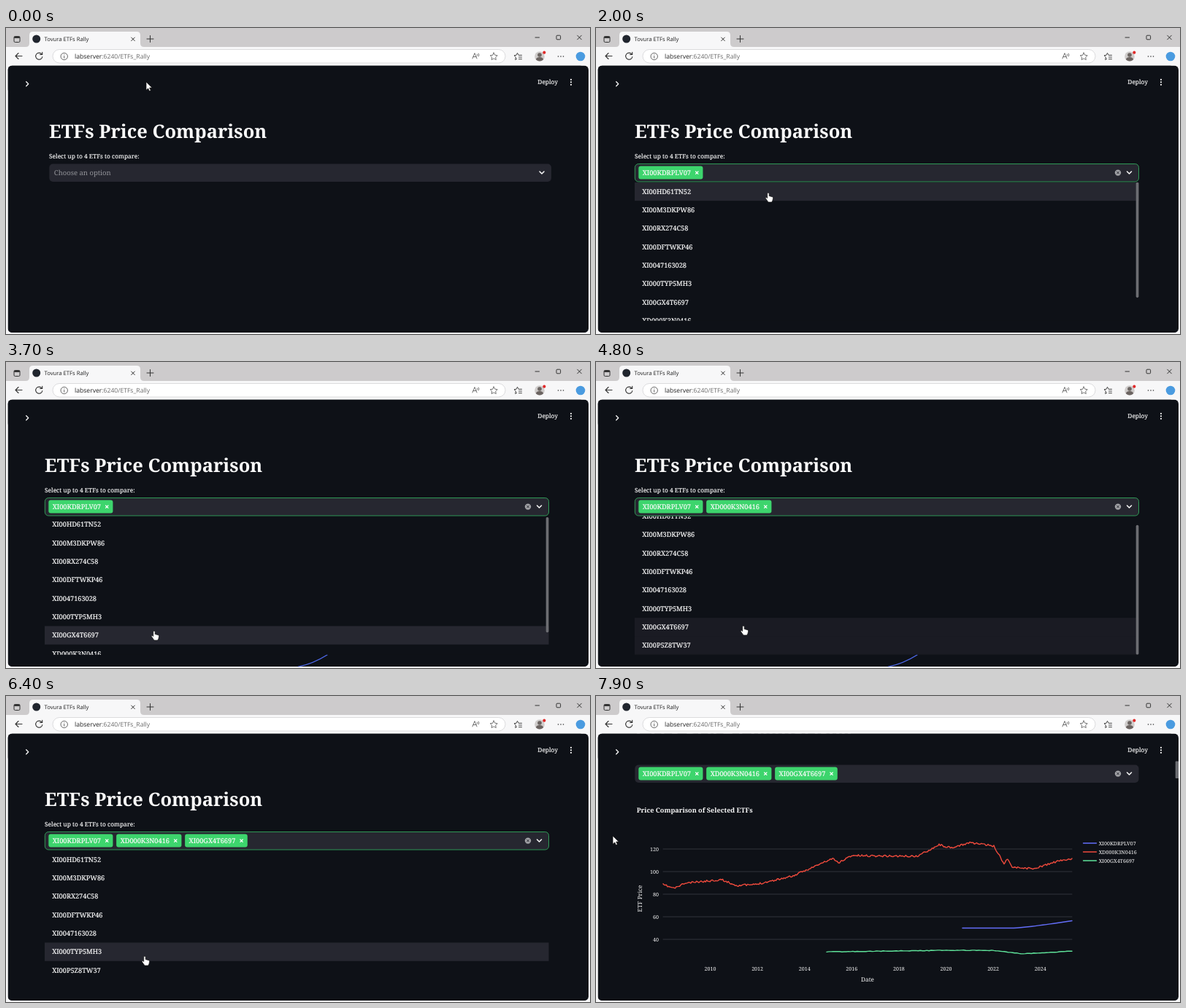
Animation, 800 px wide and 420 px high, one loop 8 s. Source, as an HTML page:

```html
<!DOCTYPE html>
<html lang="en">
<head>
<meta charset="utf-8">
<title>Price comparison</title>
<style>
  html, body { margin: 0; width: 100%; height: 100%; overflow: hidden; background: #f7f7f8; }
  svg { display: block; width: 800px; height: 420px; }
  text { font-family: "Noto Serif", serif; fill: #fafafa; white-space: pre; text-rendering: geometricPrecision; }
  .ui { font-family: "Open Sans", "Noto Sans", sans-serif; fill: #222; }
  .opt { font-size: 9.2px; stroke: #fafafa; stroke-width: .2; }
  .small { font-size: 8.4px; stroke: #fafafa; stroke-width: .15; }
  .faint { fill: #94959a; stroke: none; }
  .tick { font-size: 7.1px; }
  .axis { font-size: 8.2px; text-anchor: middle; }
  .line { fill: none; stroke-linecap: round; stroke-linejoin: round; }
</style>
</head>
<body>
<svg id="stage" viewBox="0 0 800 420"></svg>
<script>
const LOOP = 8000, ROW = 25.33, TOP = 211.8, VIEW = 190;
const PAGE = '#0e1117', FIELD = '#262730', GREEN = '#3dd56d', WHITE = '#fafafa', THUMB = '#6c6d72';
const CODES = ['XI00KDRPLV07', 'XI00HD61TN52', 'XI00M3DKPW86', 'XI00RX274C58', 'XI00DFTWKP46',
  'XI0047163028', 'XI000TYP5MH3', 'XI00GX4T6697', 'XD000K3N0416', 'XI00P5Z8TW37'];
const OPEN = 700, CLOSE = 7380, CHART = 6750;
const PICKS = [{ at: 1950, code: 0 }, { at: 4710, code: 8 }, { at: 6000, code: 7 }];
const RUNS = [[2250, 2600], [5250, 5900], [6450, 7200]];
// pointer moves: start, end, x, y
const START = [192, 74];
const MOVES = [[150, 600, 240, 203], [1150, 1500, 236, 226], [2200, 2700, 228, 256], [2850, 3550, 203, 369],
  [4450, 4460, 202, 362], [4850, 5300, 193, 344], [5300, 5600, 190, 357], [6450, 6800, 23, 192]];

const $ = id => document.getElementById(id);
const tag = (name, attrs, body = '') =>
  `<${name} ${Object.entries(attrs).map(([k, v]) => `${k}="${v}"`).join(' ')}>${body}</${name}>`;
const rect = (x, y, width, height, fill, rx = 0, more = {}) => tag('rect', { x, y, width, height, fill, rx, ...more });
const dot = (cx, cy, r, fill, more = {}) => tag('circle', { cx, cy, r, fill, ...more });
const ring = (x, y, r, stroke) => dot(x, y, r, 'none', { stroke });
const line = (d, stroke, w = 1, more = {}) => tag('path', { class: 'line', d, stroke, 'stroke-width': w, ...more });
const text = (x, y, s, cls, more = {}) => tag('text', { x, y, class: cls, ...more }, s);
const cross = (x, y, r, color, w) => line(`M${x - r} ${y - r}l${2 * r} ${2 * r}m0 ${-2 * r}l${-2 * r} ${2 * r}`, color, w);
const group = (id, body, more = {}) => tag('g', { id, ...more }, body);
const poly = pts => 'M' + pts.map(p => p.map(v => v.toFixed(1)).join(' ')).join('L');
const range = (n, f) => Array.from({ length: n }, (_, i) => f(i));
const lerp = (a, b, u) => a + (b - a) * u;
const ease = (t, a, b) => {
  const u = Math.min(1, Math.max(0, (t - a) / (b - a)));
  return u * u * (3 - 2 * u);
};

let seed = 11;
const rand = () => (seed = seed * 16807 % 2147483647) / 2147483647;

function star(cx, cy, r) {
  const pts = range(10, i => {
    const a = i * Math.PI / 5, q = i % 2 ? r * .5 : r;
    return [cx + q * Math.sin(a), cy - q * Math.cos(a)];
  });
  return poly(pts) + 'z';
}

function browser() {
  const ink = '#333', grey = '#666';
  const frame = rect(0, 0, 800, 26, '#cdcbcc') +
    tag('path', { d: 'M27 26q5 0 5-5v-11q0-5 5-5h142q5 0 5 5v11q0 5 5 5z', fill: '#f7f7f8' });
  const tabs = rect(11, 11.5, 8, 8, 'none', 1.5, { stroke: ink }) + rect(11, 11.5, 8, 2.5, ink, 1) +
    dot(41.7, 15, 5.5, '#20252e') + text(52.5, 18, 'Tovura ETFs Rally', 'ui', { 'font-size': 7.7 }) +
    cross(174, 15.3, 2.3, ink, 1) + line('M193 15h9m-4.5-4.5v9', ink);
  const controls = line('M725 13h5.5', ink) + rect(754, 10.2, 5.6, 5.6, 'none', 1, { stroke: ink }) +
    cross(785.5, 13, 2.8, ink, 1);
  const address = line('M22 38.5h-9m4-4l-4 4l4 4', ink, 1.1) +
    line('M49 36a4.6 4.6 0 1 0 .8 3.5M49.7 33.3v3.2h-3.2', ink, 1.1) +
    rect(64, 29.5, 620, 18.5, '#fff', 9.2, { stroke: '#d4d4d6', 'stroke-width': .8 }) +
    ring(79.7, 39, 4.7, grey) + line('M79.7 38.5v2.8M79.7 36.6v.1', grey) +
    text(94, 42, `labserver${tag('tspan', { fill: '#6a6a6a' }, ':6240/ETFs_Rally')}`, 'ui', { 'font-size': 8.6 });
  const tools = line('M639 42l3-7.5l3 7.5m-5-2.5h4M645.5 36q1 1 0 2.2M647.3 35q1.6 2 0 4', grey, .9) +
    line(star(668.2, 39.3, 5.3), grey, .9) +
    line('M706.5 37.3h-4.3l-1.7-3l-1.5 3l-3 .4l2.400 2.300l-.7 3.500l2-1.200M702.500 40h4m-4 2.700h4', ink, .9) +
    dot(731, 39, 6.8, '#cfcccb') + dot(731, 37, 2.8, '#6b6461') +
    tag('path', { d: 'M726 43.5q0-3.500 5-3.500t5 3.500q-5 4-10 0z', fill: '#6b6461' }) + dot(737.3, 33.7, 2.1, '#e02b2b') +
    range(3, i => dot(756.5 + i * 3.5, 39, .8, ink)).join('') + dot(787, 39, 6.3, '#4a9be0');
  return frame + tabs + controls + address + tools;
}

// fills the gaps between key points with seeded jitter
function rough(keys, step, amp) {
  return keys.slice(1).flatMap(([x, y], i) => {
    const [x0, y0] = keys[i], n = Math.ceil((x - x0) / step);
    return range(n, k => [lerp(x0, x, k / n), lerp(y0, y, k / n) + (rand() - .5) * amp]);
  }).concat([keys[keys.length - 1]]);
}

function chart() {
  const yOf = v => 396 - v * 1.55, xOf = year => 156.5 + (year - 2010) * 32.3;
  const label = (x, y, s, anchor) => text(x, y, s, 'tick', { 'text-anchor': anchor });
  const red = [[92, 259], [107, 264], [122, 257], [172, 252], [192, 260], [217, 259], [270, 247], [324, 223], [332, 229],
    [350, 219], [440, 220], [470, 204], [487, 209], [512, 201], [545, 206], [559, 230], [564, 223], [570, 235], [600, 237],
    [632, 227], [652, 223]];
  const green = [[316, 351.2], [480, 349], [542, 349.2], [585, 353.8], [652, 350.2]];
  const blue = range(31, i => [502 + i * 5, 318.5 - 10 * Math.pow(Math.max(0, i - 14) / 16, 1.25)]);
  const series = [['#636efa', blue, 0], ['#ef4a3c', rough(red, 1.6, 2.6), 8], ['#5fe39a', rough(green, 3, .7), 7]];
  return text(55.7, 160.3, 'Price Comparison of Selected ETFs', '', { 'font-size': 9.1, 'font-weight': 700 }) +
    range(5, i => 40 + i * 20).map(v =>
      line(`M92 ${yOf(v)}H652`, '#3a3d45', .8) + label(86, yOf(v) + 2.6, v, 'end')).join('') +
    range(8, i => 2010 + i * 2).map(v => label(xOf(v), 376.5, v, 'middle')).join('') +
    text(372, 392, 'Date', 'axis') + text(0, 0, 'ETF Price', 'axis', { transform: 'translate(62.5 278) rotate(-90)' }) +
    series.map(([color, pts, code], i) => line(poly(pts), color, 1.4) +
      line(`M667.5 ${202 + i * 12}h18`, color, 1.3) + text(688.7, 204.6 + i * 12, CODES[code], 'tick')).join('');
}

function header() {
  const grey = '#85878d';
  const wave = y => `M614 ${y}q1.7-1.6 3.3 0t3.3 0t3.3 0t3.3 0`;
  const bike = ring(616.7, 77, 3.6, grey) + ring(625.3, 77, 3.6, grey) + dot(624, 68.7, 1.5, grey) +
    line('M616.7 77l3-4.5l3-1.5l1.5 2.5h2M619.7 72.5l2.3 2v3', grey, 1.1);
  const swim = dot(625, 72.6, 1.8, grey) + line('M616.5 69.5l4-.7l3 5M621 71l-4.5 4', grey, 1.3) +
    line(wave(77) + wave(80.3), grey, 1.1);
  return rect(2.5, 51.6, 790, 38.4, PAGE, 6) + line('M27.7 73.8l3 3l-3 3', WHITE, 1.3) +
    group('run', group('bike', bike) + group('swim', swim) +
      text(634, 77.3, 'RUNNING...', 'small faint') + text(694.5, 77.6, 'Stop', 'small')) +
    text(728.3, 77.3, 'Deploy', 'small') + range(3, i => dot(774, 70.8 + i * 3.5, 1.1, WHITE)).join('');
}

function content() {
  const chip = (p, i) => group('chip' + i, rect(0, 189.5, 0, 18, GREEN, 3) +
    text(5.5, 202.1, CODES[p.code], 'opt') + group('x' + i, cross(0, 198.7, 1.7, '#fff', 1.2)));
  return group('chart', chart(), { transform: 'translate(0 92)' }) +
    line('M400 418.3Q420 414.5 440 402', '#4f6bf0', 1.3, { id: 'solo' }) +
    group('head', text(0, 151.3, 'ETFs Price Comparison', '', { 'font-size': 25.5, 'font-weight': 700 }) +
      text(0, 178.8, 'Select up to 4 ETFs to compare:', 'small')) +
    rect(0, 186.5, 0, 24.5, FIELD, 5, { id: 'field', 'stroke-width': .9 }) +
    text(0, 202.2, 'Choose an option', 'faint', { id: 'hint', 'font-size': 9.5 }) +
    line('M59 192.5v13', WHITE, .9, { id: 'caret' }) + PICKS.map(chip).join('') +
    group('clear', dot(715, 198.6, 4.2, '#a2a3a7') + cross(715, 198.6, 1.5, FIELD, 1)) +
    line('M-3-1.5l3 3l3-3', WHITE, 1.5, { id: 'arrow' });
}

function menu() {
  return rect(53, TOP, 691, VIEW, PAGE, 0, { id: 'menuBack' }) +
    CODES.map((c, i) => group('row' + i, rect(53, 0, 690.5, ROW, FIELD, 0, { id: 'glow' + i }) +
      text(63.2, 16, c, 'opt'))).join('') +
    rect(739.7, 0, 3.7, 0, THUMB, 1.8, { id: 'thumb' });
}

function pointer() {
  const shape = (id, d) => tag('path', { id, d, fill: '#fff', stroke: '#111', 'stroke-width': .7 });
  return shape('point', 'M0 0v11.3l2.7-2.4l1.7 3.7l1.9-.9l-1.7-3.6h3.6z') +
    shape('hand', 'M-1.3.8q1.3-1.5 2.5 0v3.7l4.3 1.2q1.3.5 1.1 2l-.7 3.3l-1.2 2h-4.7l-3.7-5.2q-.5-1.5 1-1.3l1.4 1z') +
    line('M-2.5-5.5q2.5 0 2.5 1.5v8q0 1.5 2.5 1.5M2.5-5.5q-2.5 0-2.5 1.5M0 4q0 1.5-2.5 1.5', '#050505', 1.2, { id: 'beam' });
}

$('stage').innerHTML =
  '<defs><clipPath id="page"><rect x="2.5" y="51.6" width="795.5" height="366.7" rx="6"/></clipPath>' +
  `<clipPath id="menuClip"><rect id="menuBox" x="53" y="${TOP}" width="691"/></clipPath></defs>` + browser() +
  group('view', rect(2.5, 51.6, 795.5, 366.7, PAGE) + group('content', content()) +
    group('menu', menu(), { 'clip-path': 'url(#menuClip)' }) + header() +
    rect(793.7, 89.5, 4.5, 23.5, THUMB, 1, { id: 'bar' }), { 'clip-path': 'url(#page)' }) +
  group('pointer', pointer());

const set = (id, attrs) => { for (const k in attrs) $(id).setAttribute(k, attrs[k]); };
const move = (id, x, y) => set(id, { transform: `translate(${x} ${y})` });
const show = (id, on) => { $(id).style.display = on ? '' : 'none'; };
const within = (t, a, b) => t >= a && t < b;

// each chip is as wide as its text
let chipX = 58.3;
PICKS.forEach((p, i) => {
  const w = $('chip' + i).querySelector('text').getComputedTextLength() + 22;
  $('chip' + i).firstChild.setAttribute('width', w);
  move('x' + i, w - 8.2, 0);
  move('chip' + i, chipX, 0);
  chipX += w + 4.7;
});

const picked = t => PICKS.filter(p => t >= p.at).length;
const options = n => CODES.map((_, i) => i).filter(i => !PICKS.slice(0, n).some(p => p.code === i));
const cursor = t => MOVES.reduce(([x, y], [a, b, toX, toY]) => {
  const u = ease(t, a, b);
  return [lerp(x, toX, u), lerp(y, toY, u)];
}, START);

function menuAt(t) {
  const n = picked(t), list = options(n), total = list.length * ROW, height = Math.min(VIEW, total);
  return { n, list, total, height, off: n > 2 ? 0 : (total - height) * ease(t, 3650, 4100) };
}

function overMenu(t) {
  const [x, y] = cursor(t);
  return within(t, OPEN, CLOSE) && within(x, 53, 743) && within(y, TOP, TOP + menuAt(t).height);
}

const hovered = t => overMenu(t) ? Math.floor((cursor(t)[1] - TOP + menuAt(t).off) / ROW) : 0;

function drawMenu(t) {
  const { n, list, total, height, off } = menuAt(t);
  set('menuBox', { height });
  set('menuBack', { height });
  // highlights fade over the last 200 ms of hovering
  const glow = CODES.map(() => 0);
  range(10, k => glow[hovered(t - k * 20)] += .1);
  CODES.forEach((_, i) => show('row' + i, list.includes(i)));
  list.forEach((code, i) => {
    move('row' + code, 0, TOP + i * ROW - off);
    set('glow' + code, { opacity: glow[i] });
  });
  show('thumb', n && total > VIEW);
  set('thumb', { y: TOP + off * VIEW / total, height: VIEW * VIEW / total });
}

function drawField(t, n, open) {
  const left = t < OPEN ? 59 : 53, right = n ? 743.5 : 747;
  move('head', left, 0);
  set('field', { x: left + .3, width: right - left - .3, stroke: open ? '#33a85c' : 'none' });
  set('hint', { x: left + 6.8 });
  show('hint', !n);
  show('caret', open && !n && Math.floor(t / 500) % 2 === 0);
  PICKS.forEach((_, i) => show('chip' + i, i < n));
  show('clear', n);
  move('arrow', right - 13, 198.5);
}

function drawPointer(t) {
  const [x, y] = cursor(t), hand = overMenu(t);
  const beam = !hand && within(y, 187, 211) && within(x, 53, 743);
  move('pointer', x, y);
  show('hand', hand);
  show('beam', beam);
  show('point', !hand && !beam);
}

function draw(t) {
  const open = within(t, OPEN, CLOSE), odd = Math.floor(t / 200) % 2;
  move('content', 0, -92 * ease(t, 7450, 7800));
  drawField(t, picked(t), open);
  show('menu', open);
  drawMenu(t);
  show('solo', within(t, 2400, 5300));
  show('chart', t >= CHART);
  show('bar', t >= CHART);
  show('run', RUNS.some(([a, b]) => within(t, a, b)));
  show('bike', !odd);
  show('swim', odd);
  drawPointer(t);
}

function frame() {
  draw(performance.now() % LOOP);
  requestAnimationFrame(frame);
}
frame();
</script>
</body>
</html>
```
